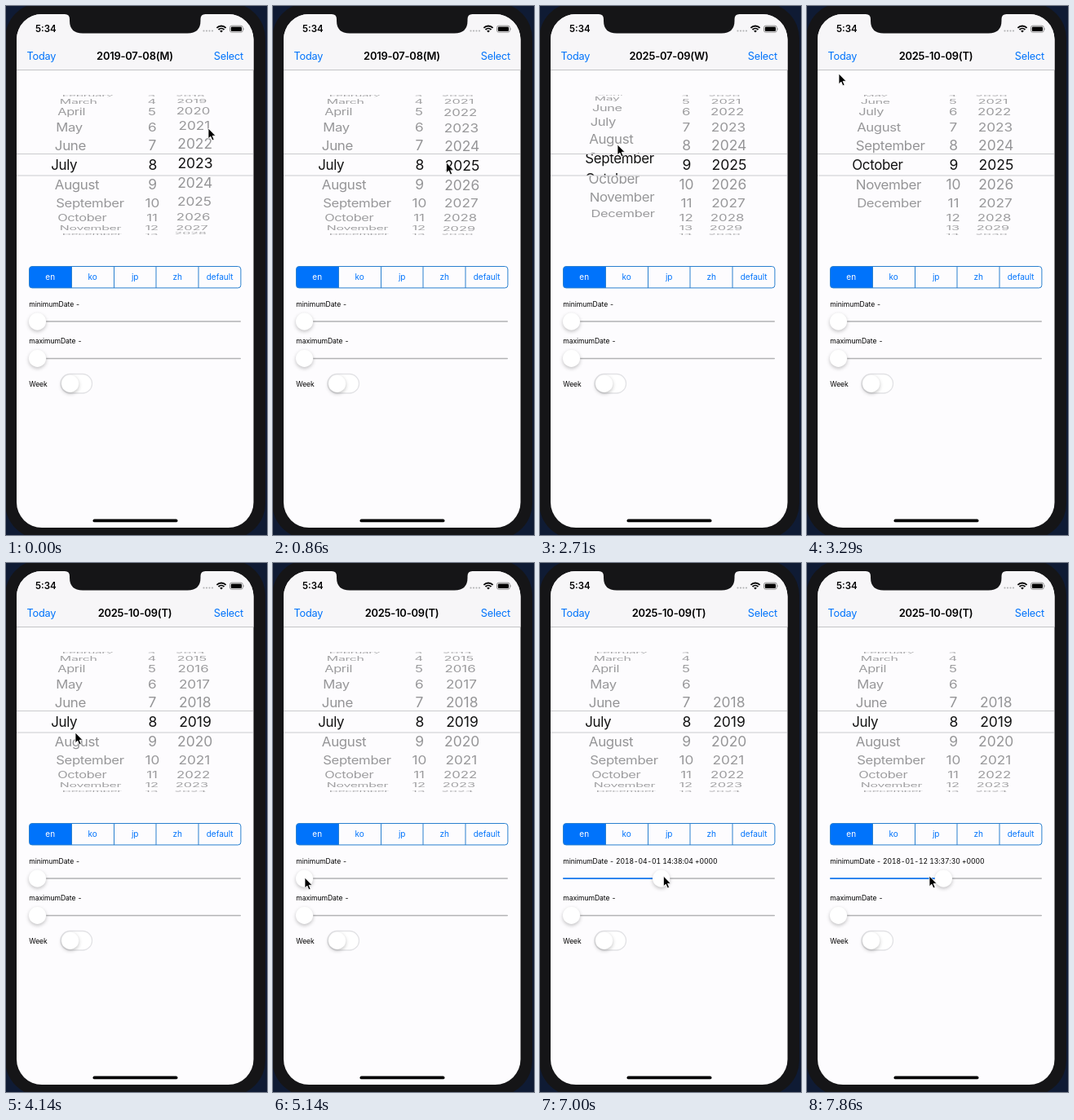
Recreate the animation shown at these times as an HTML page. Size 320 by 649 pixels, loop 8000 ms.

```html
<!DOCTYPE html>
<html lang="en">
<head>
<meta charset="utf-8">
<title>Date picker demo</title>
<style>
  html, body { margin: 0; width: 100%; height: 100%; overflow: hidden; background: #0f1b34; }
  svg { display: block; width: 100%; height: 100%; font-family: Inter, Roboto, sans-serif; }
  .blue { fill: #0073fb; }
  .line { fill: none; stroke: #2a80cf; }
  .track { fill: #b2b2b4; }
  .mid { text-anchor: middle; }
  .bar { font-size: 12.7px; letter-spacing: -.2px; }
  .title { font-size: 12.9px; font-weight: 600; letter-spacing: -.2px; }
  .label { font-size: 8.6px; letter-spacing: -.07px; font-variant-numeric: tabular-nums; }
  .seg { font-size: 10px; text-anchor: middle; }
  .knob { fill: #fff; stroke: #0000000d; stroke-width: .5; filter: drop-shadow(0 2px 2px #00000038); }
  .far { fill: #949496; font-size: 17px; }
  .near { fill: #111; font-size: 16.9px; }
  .month { letter-spacing: -.35px; }
  .num { text-anchor: middle; font-size: 17.5px; }
</style>
</head>
<body>
<svg viewBox="0 0 320 649">
  <defs>
    <clipPath id="screen"><rect x="13" y="10" width="290.5" height="630" rx="31"/></clipPath>
    <clipPath id="outside"><path d="M13 107H303V181.5H13ZM13 208.5H303V281H13Z"/></clipPath>
    <clipPath id="inside"><rect x="13" y="182" width="290" height="26"/></clipPath>
  </defs>

  <rect width="320" height="649" fill="#0f1b34"/>
  <rect x="-1" y="-4" width="319" height="658" rx="44" fill="#151517"/>
  <g clip-path="url(#screen)">
    <rect width="320" height="649" fill="#fdfcfe"/>
    <rect width="320" height="78" fill="#f7f6f8"/>
    <rect y="78" width="320" height="1" fill="#c4c4c6"/>
  </g>
  <path d="M72 8V10Q78 10 78 16V18Q78 33.5 94 33.5H222.5Q238.5 33.5 238.5 18V16Q238.5 10 244.5 10V8Z" fill="#151517"/>

  <text x="36" y="32.2" font-size="11.5" font-weight="600">5:34</text>
  <path d="M242.5 30.5H254" stroke="#b4b4b6" stroke-width="2.2" stroke-linecap="round" stroke-dasharray="0 3.5"/>
  <g fill="none" stroke="#000" stroke-width="1.8">
    <path d="M258.4 26.8A8 8 0 0 1 269.6 26.8M260.5 29A5 5 0 0 1 267.5 29"/>
    <path d="M262.2 30.7A2.5 2.5 0 0 1 265.8 30.7L264 32.5Z" fill="#000" stroke="none"/>
  </g>
  <rect x="274.5" y="24.2" width="15.8" height="8" rx="2.3" fill="none" stroke="#777" stroke-width=".8"/>
  <rect x="275.8" y="25.5" width="13.2" height="5.4" rx="1.2"/>
  <path d="M291.2 26.8Q292.6 28.2 291.2 29.6Z" fill="#777"/>

  <text id="today" class="bar blue" x="25.5" y="66">Today</text>
  <text id="title" class="title mid" x="158" y="66.2"></text>
  <text class="bar blue" x="291" y="66" text-anchor="end">Select</text>

  <g id="far" clip-path="url(#outside)"></g>
  <g id="near" clip-path="url(#inside)"></g>
  <path d="M13 181.5H303M13 208H303" stroke="#cbcbce"/>

  <path class="blue" d="M80.5 319.5V346H32Q28.5 346 28.5 342.5V323Q28.5 319.5 32 319.5Z"/>
  <rect class="line" x="28.5" y="319.5" width="259.4" height="26.4" rx="3.5"/>
  <path class="line" d="M80.5 319V346M132.5 319V346M184 319V346M236 319V346"/>
  <g id="segments" class="seg"></g>

  <text id="minLabel" class="label" x="28.2" y="368.5"></text>
  <rect class="track" x="28" y="386.2" width="260" height="1.6" rx=".8"/>
  <rect id="fill" class="blue" x="28" y="386.2" width="10" height="1.6" rx=".8"/>
  <circle id="knob" class="knob" cx="38.5" cy="387" r="10.7"/>

  <text class="label" x="28.2" y="414">maximumDate -</text>
  <rect class="track" x="28" y="431.7" width="260" height="1.6" rx=".8"/>
  <circle class="knob" cx="38.5" cy="432.3" r="10.7"/>

  <text class="label" x="28.2" y="466.5">Week</text>
  <rect x="67" y="451.5" width="38.5" height="23.5" rx="11.75" fill="#fff" stroke="#e2e2e5" stroke-width="1.3"/>
  <circle class="knob" cx="78.7" cy="463.2" r="10.7"/>

  <rect x="106.5" y="629.5" width="104" height="3.8" rx="1.9"/>
  <path id="cursor" d="M0 0V12.7L2.9 10.1L4.9 14.8L7.1 13.9L5.1 9.3H9Z" stroke="#fff" stroke-width=".8"/>
</svg>
<script>
const $ = id => document.getElementById(id);
const LOOP = 8000, RATE = 7;
const ROW = 16.4 * Math.PI / 180, RADIUS = 85.5, MID = 195, PITCH = 24.6;
const DAY = 864e5, NOW = Date.UTC(2019, 6, 8, 8, 34);
const MONTHS = ['January', 'February', 'March', 'April', 'May', 'June', 'July',
  'August', 'September', 'October', 'November', 'December'];

// All times below are in ticks, seven per second
const TODAY = 24, DRAG = 37;

const pointer = [[0, 248, 150], [11, 183, 227], [14, 178, 200], [17, 103, 225], [19, 95, 170],
  [23, 39, 83], [25, 39, 66], [29, 85, 208], [36, 39, 386], [DRAG, 39, 386],
  [43, 113, 384], [53, 177, 384], [55, 150, 384]];
const minimum = [[DRAG, NOW], [43, Date.UTC(2018, 8, 9, 11, 44, 11)],
  [53, NOW - 570 * DAY], [55, Date.UTC(2018, 0, 12, 13, 37, 30)]];
const titles = [[0, '2019-07-08(M)'], [8, '2025-07-08(T)'], [15, '2025-07-09(W)'], [22, '2025-10-09(T)']];

// Each spin: start, length, value where it settles
const wheels = [
  { cls: 'month', near: 55.3, far: 59.4, bend: 11, text: v => MONTHS[v] || '',
    from: 6, spins: [[16.9, 4, 9], [TODAY, 3, 6]] },
  { cls: 'num', near: 180, far: 179.6, bend: -1.4, text: v => v > 0 && v < 32 ? v : '',
    from: 8, spins: [[11, 3, 9], [TODAY, 3, 8]] },
  { cls: 'num', near: 232, far: 232, bend: -7, text: (v, least) => v >= least ? v : '',
    from: 2023.08, spins: [[0, 7, 2025], [TODAY, 4, 2019]] }
];

const easeOut = p => 1 - (1 - p) ** 2;
const progress = (t, start, length) => Math.min(1, Math.max(0, (t - start) / length));

function at(track, t, col = 1) {
  let value = track[0][col];
  for (let i = 1; i < track.length; i++) {
    const a = track[i - 1], b = track[i];
    value += (b[col] - a[col]) * progress(t, a[0], b[0] - a[0]);
  }
  return value;
}

function spin(w, t) {
  return w.spins.reduce((pos, [start, length, to]) =>
    pos + (to - pos) * easeOut(progress(t, start, length)), w.from);
}

function addText(parent, cls, x, y, text = '') {
  const el = document.createElementNS('http://www.w3.org/2000/svg', 'text');
  el.setAttribute('class', cls);
  el.setAttribute('x', x);
  el.setAttribute('y', y);
  el.textContent = text;
  return $(parent).appendChild(el);
}

function put(el, text, x, y, sx, sy) {
  el.textContent = text;
  el.setAttribute('transform', `translate(${x} ${y}) scale(${sx} ${sy})`);
}

['en', 'ko', 'jp', 'zh', 'default'].forEach((name, i) => {
  const el = addText('segments', 'blue', 54.2 + 52 * i, 336, name);
  if (i === 0) el.style.fill = '#fff';
});

for (const w of wheels) {
  w.rows = Array.from({ length: 13 }, () => addText('far', 'far ' + w.cls, 0, 6.3));
  w.picks = Array.from({ length: 3 }, () => addText('near', 'near ' + w.cls, 0, 6.3));
}

function drawWheel(w, t, least) {
  const pos = spin(w, t), base = Math.round(pos);
  w.rows.forEach((el, i) => {
    const v = base + i - 6, angle = (v - pos) * ROW, depth = Math.cos(angle);
    const seen = Math.abs(angle) < 1.56;
    put(el, seen ? w.text(v, least) : '', w.far + w.bend * (1 - depth),
      MID + RADIUS * Math.sin(angle), 1 - .11 * (1 - depth), Math.max(depth, .01));
    el.setAttribute('opacity', .8 + .2 * depth);
  });
  w.picks.forEach((el, i) => {
    const v = base + i - 1;
    put(el, w.text(v, least), w.near, MID + (v - pos) * PITCH, 1, 1);
  });
}

function draw(t) {
  const active = t > DRAG, date = new Date(at(minimum, t));
  const least = active ? date.getUTCFullYear() : 0;
  wheels.forEach(w => drawWheel(w, t, least));

  const stamp = date.toISOString().slice(0, 19).replace('T', ' ');
  $('minLabel').textContent = 'minimumDate -' + (active ? ` ${stamp} +0000` : '');
  const x = 38.5 + 238 * (NOW - date) / (1000 * DAY);
  $('knob').setAttribute('cx', x);
  $('fill').setAttribute('width', x - 28);

  $('title').textContent = titles.filter(k => k[0] <= t).pop()[1];
  $('today').setAttribute('opacity', t === TODAY + 1 ? .35 : 1);
  $('cursor').setAttribute('transform', `translate(${at(pointer, t)} ${at(pointer, t, 2)})`);
}

// The screen refreshes in steps; 6 ms absorbs rounding of step times
let last = -1;
function tick() {
  const step = Math.floor(((performance.now() + 6) % LOOP) * RATE / 1000);
  if (step !== last) draw(last = step);
  requestAnimationFrame(tick);
}
tick();
</script>
</body>
</html>
```
